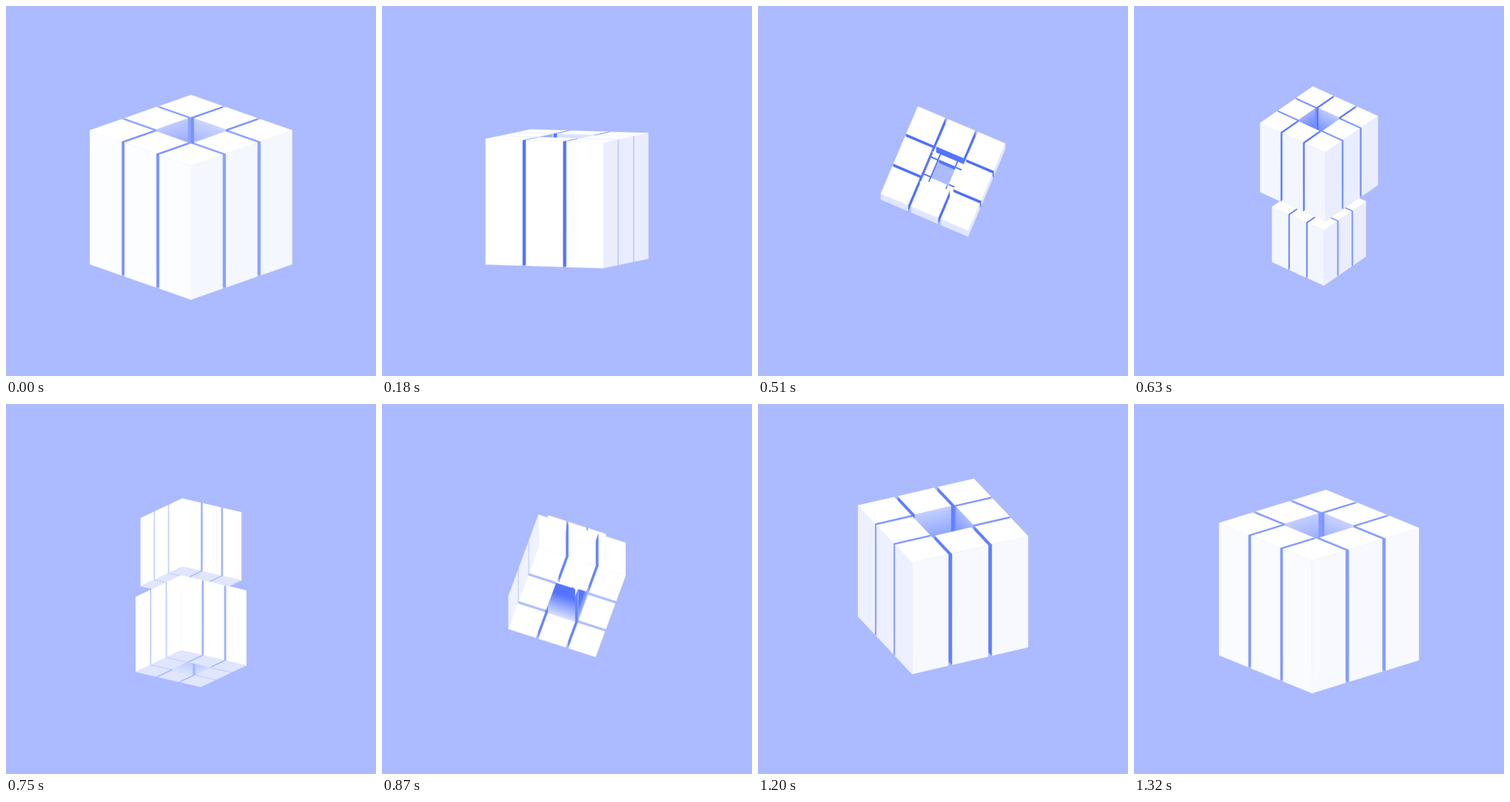
An HTML page with a canvas that plays this animation: 500 by 500 pixels, repeating every 1.35 s.

```html
<!DOCTYPE html>
<html lang="en">
<head>
<meta charset="utf-8">
<title>Tumbling cubes</title>
<style>
html, body { margin: 0; width: 100%; height: 100%; overflow: hidden; background: #acbbff; }
canvas { display: block; width: 100vw; height: 100vh; }
</style>
</head>
<body>
<canvas id="stage" width="500" height="500"></canvas>
<script>
const ctx = document.getElementById('stage').getContext('2d');
const LOOP = 1350, STEP = 30, SIZE = 193.2;
const GAP = 0.031, BAR = (1 - 2 * GAP) / 3;
const DEG = Math.PI / 180;
const BLUE = [76, 110, 255], WHITE = [255, 255, 255], SHADE = [224, 230, 255];

const clamp = (v, lo = 0, hi = 1) => Math.min(hi, Math.max(lo, v));
const mix = (a, b, k) => 'rgb(' + a.map((v, i) => Math.round(v + (b[i] - v) * k)) + ')';

// Monotone cubic through [x, y] points, flat at both ends.
function curve(pts) {
  const sec = pts.slice(1).map((p, i) => (p[1] - pts[i][1]) / (p[0] - pts[i][0]));
  const slope = pts.map((p, i) => {
    const a = sec[i - 1] || 0, b = sec[i] || 0;
    return a * b > 0 ? 2 * a * b / (a + b) : 0;
  });
  return x => {
    let i = 0;
    while (i < pts.length - 2 && x > pts[i + 1][0]) i++;
    const [x0, y0] = pts[i], [x1, y1] = pts[i + 1];
    const h = x1 - x0, t = (x - x0) / h, r = 1 - t;
    return y0 * r * r * (1 + 2 * t) + slope[i] * h * t * r * r
      + y1 * t * t * (3 - 2 * t) - slope[i + 1] * h * t * t * r;
  };
}

const pitchAt = curve([[0, 20.5], [.133, 4.7], [.289, -48], [.467, -146], [.644, -248.9],
  [.8, -313], [.978, -339.2], [1, -339.5]]);
const oldY = curve([[0, 258.5], [.133, 260.5], [.289, 248.5], [.4, 217], [.467, 200],
  [.53, 195], [.644, 214], [.67, 231], [.8, 280], [1, 258.5]]);
const newY = curve([[0, 258.5], [.133, 230], [.289, 195], [.375, 225], [.4, 250], [.467, 305],
  [.53, 313], [.644, 246], [.67, 231], [.78, 214], [.8, 216.5], [.822, 219.5], [.978, 253.5], [1, 258.5]]);

// Camera for a yaw and pitch: returns right, down and toward-viewer components.
function camera(yaw, pitch) {
  const cy = Math.cos(yaw), sy = Math.sin(yaw), cp = Math.cos(pitch), sp = Math.sin(pitch);
  return (x, y, z) => {
    const depth = z * cy - x * sy;
    return [x * cy + z * sy, depth * sp - y * cp, y * sp + depth * cp];
  };
}

const light = n => -0.08 * n[0] - 0.52 * n[1] + 0.94 * n[2];

function polygon(pts, fill) {
  ctx.beginPath();
  pts.forEach(p => ctx.lineTo(p[0], p[1]));
  ctx.closePath();
  ctx.fillStyle = ctx.strokeStyle = fill;
  ctx.fill();
  ctx.stroke();
}

// Fades from the lit rim of the shaft into blue.
function wallFill(rimA, rimB, down, lam) {
  const hx = rimB[0] - rimA[0], hy = rimB[1] - rimA[1], len = Math.hypot(hx, hy) || 1;
  const nx = -hy / len, ny = hx / len, k = down[0] * nx + down[1] * ny;
  const g = ctx.createLinearGradient(rimA[0], rimA[1], rimA[0] + nx * k, rimA[1] + ny * k);
  g.addColorStop(0, mix(BLUE, WHITE, 0.88 * (1 - Math.exp(-3 * Math.max(0, lam)))));
  g.addColorStop(1, mix(BLUE, WHITE, 0.04));
  return g;
}

const SIDES = [[1, 0], [-1, 0], [0, 1], [0, -1]];

function drawCube(cam, size, cy) {
  const half = BAR / 2, end = cam(0, 1, 0)[2] >= 0 ? 0.5 : -0.5;
  const at = (x, y, z) => {
    const p = cam(x * size, y * size, z * size);
    return [250 + p[0], cy + p[1]];
  };
  const bars = [];
  for (let i = -1; i <= 1; i++)
    for (let j = -1; j <= 1; j++)
      if (i || j) bars.push({ i, j, depth: cam(i, 0, j)[2] });
  bars.sort((a, b) => a.depth - b.depth);

  for (const { i, j } of bars) {
    const x = i * (BAR + GAP), z = j * (BAR + GAP);
    for (const [nx, nz] of SIDES) {
      const n = cam(nx, 0, nz);
      if (n[2] <= 0.001) continue;
      const lam = light(n);
      const corner = (s, y) => at(x + half * (nx + nz * s), y, z + half * (nz + nx * s));
      const a = corner(-1, end), b = corner(1, end);
      const face = [a, b, corner(1, -end), corner(-1, -end)];
      const ni = i + nx, nj = j + nz;
      let fill;
      if (Math.abs(ni) > 1 || Math.abs(nj) > 1) {
        fill = mix(SHADE, WHITE, clamp((lam - 0.1) / 0.5));
      } else if (!ni && !nj) {
        const fade = size * (0.25 + 0.6 * clamp(lam));
        fill = wallFill(a, b, cam(0, -Math.sign(end) * fade, 0), lam);
      } else {
        fill = mix(BLUE, WHITE, clamp(lam - 0.2, 0, 0.8));
      }
      polygon(face, fill);
    }
    const cap = [[-1, -1], [1, -1], [1, 1], [-1, 1]]
      .map(([u, v]) => at(x + u * half, end, z + v * half));
    const lam = light(cam(0, Math.sign(end), 0));
    polygon(cap, mix(SHADE, WHITE, clamp((lam - 0.1) / 0.5)));
  }
}

function render(ms) {
  const u = Math.floor((ms % LOOP) / STEP) * STEP / LOOP;
  const pitch = pitchAt(u) * DEG;
  const cam = camera((180 * u - 45) * DEG, pitch);
  const newSize = SIZE * Math.min(1, u + 0.07 * Math.max(0, u - 0.8));
  const shrink = () => drawCube(cam, SIZE * (1 - 0.89 * u), oldY(u));
  // The young cube stays hidden inside the shaft at first.
  const grow = () => { if (u > 0.17) drawCube(cam, newSize, newY(u)); };

  ctx.fillStyle = '#acbbff';
  ctx.fillRect(0, 0, 500, 500);
  ctx.lineWidth = 0.4;
  ctx.lineJoin = 'round';
  if (Math.sin(pitch) < 0 || u < 0.17) { grow(); shrink(); }
  else { shrink(); grow(); }
}

let start;
function tick(now) {
  if (start === undefined) start = now;
  render(Math.max(0, now - start));
  requestAnimationFrame(tick);
}
render(0);
requestAnimationFrame(tick);
</script>
</body>
</html>
```
